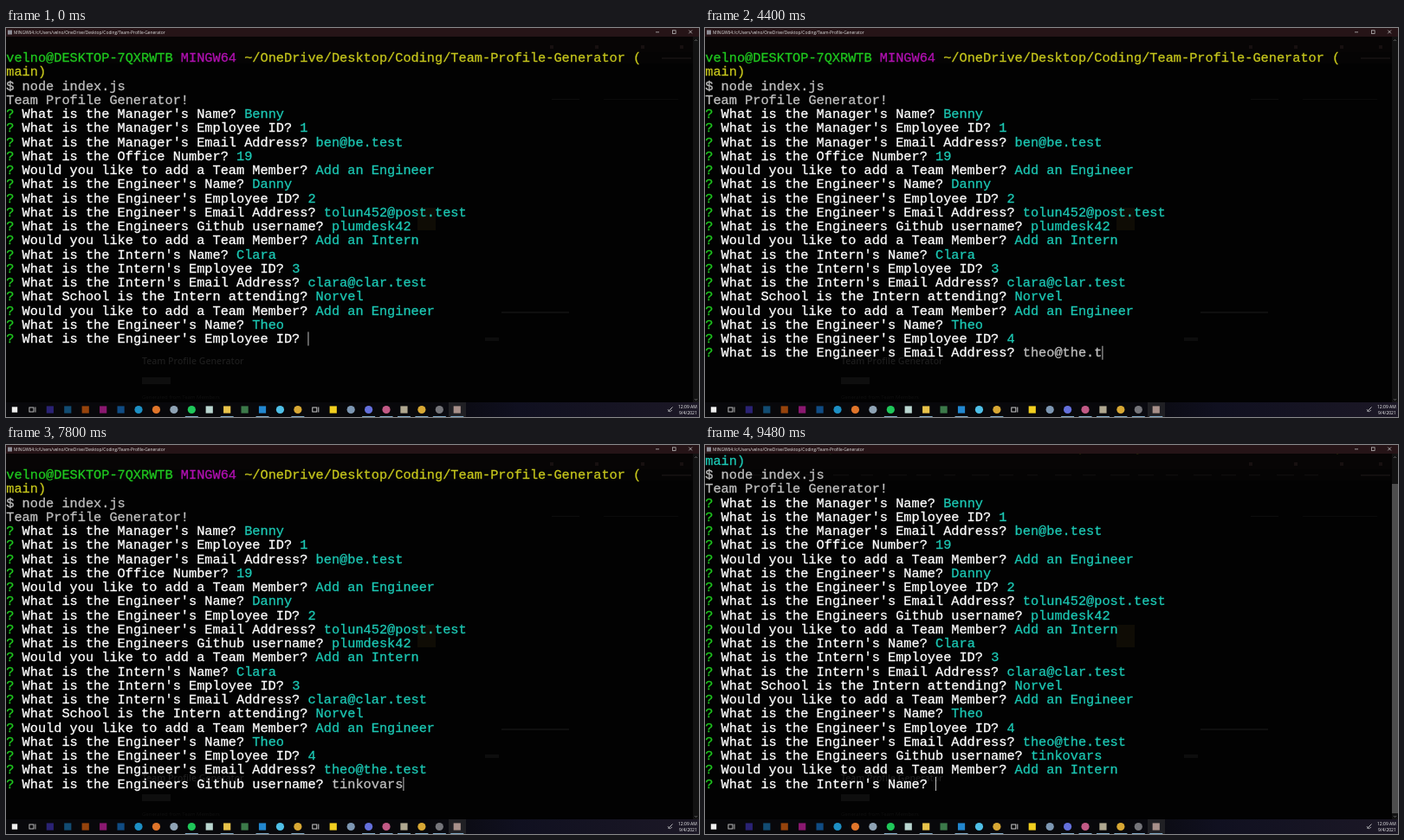
Animation of 800x450 px, one loop 9.52 s. Source, as an HTML page with a canvas:

```html
<!DOCTYPE html>
<html lang="en">
<head>
<meta charset="utf-8">
<title>Team Profile Generator</title>
<style>
html, body { margin: 0; width: 100%; height: 100%; overflow: hidden; background: #000; }
canvas { display: block; }
</style>
</head>
<body>
<canvas id="stage" width="800" height="450"></canvas>
<script>
const ctx = document.getElementById('stage').getContext('2d');
const LOOP = 9520, BLINK = 560;
const CHAR = 9.162, ROW = 16.25, BASE = 39, LEFT = 0.3;
const MONO = '15.27px "Liberation Mono", monospace';
const SANS = '"Open Sans", sans-serif';
const WHITE = '#ffffff', GRAY = '#bfbfbf', CYAN = '#1cc8b4', GREEN = '#1fc81f',
      MAGENTA = '#b010b0', YELLOW = '#c6c61c';

const MEMBER = 'Would you like to add a Team Member?';
const ENGINEER = 'Add an Engineer', INTERN = 'Add an Intern';
const EMAIL = { text: 'theo@the.test', start: 2800, step: 172 };
const USER = { text: 'tinkovars', start: 6600, step: 140 };
const ID_KEY = 360, ID_ENTER = 520, EMAIL_ENTER = 5120, USER_ENTER = 7900,
      THUMB_FADE = 8000, ARROW_DOWN = 8920, MENU_ENTER = 9160;

const ask = (question, answer = '', color = CYAN) =>
  [['? ', GREEN], [question + ' ', WHITE], [answer, color]];

const history = [
  [['velno@DESKTOP-7QXRWTB ', GREEN], ['MINGW64 ', MAGENTA],
   ['~/OneDrive/Desktop/Coding/Team-Profile-Generator (', YELLOW]],
  [['main)', YELLOW]],
  [['$ node index.js', GRAY]],
  [['Team Profile Generator!', GRAY]],
  ask("What is the Manager's Name?", 'Benny'),
  ask("What is the Manager's Employee ID?", '1'),
  ask("What is the Manager's Email Address?", 'ben@be.test'),
  ask('What is the Office Number?', '19'),
  ask(MEMBER, ENGINEER),
  ask("What is the Engineer's Name?", 'Danny'),
  ask("What is the Engineer's Employee ID?", '2'),
  ask("What is the Engineer's Email Address?", 'tolun452@post.test'),
  ask('What is the Engineers Github username?', 'plumdesk42'),
  ask(MEMBER, INTERN),
  ask("What is the Intern's Name?", 'Clara'),
  ask("What is the Intern's Employee ID?", '3'),
  ask("What is the Intern's Email Address?", 'clara@clar.test'),
  ask('What School is the Intern attending?', 'Norvel'),
  ask(MEMBER, ENGINEER),
  ask("What is the Engineer's Name?", 'Theo'),
];

function typed({ text, start, step }, t) {
  const count = Math.max(0, Math.min(text.length, Math.floor((t - start) / step) + 1));
  return { text: text.slice(0, count), last: count ? start + (count - 1) * step : -Infinity };
}

// Rows on screen at time t, and when the cursor last moved (null while hidden).
function terminal(t) {
  const rows = history.slice();
  let moved = -160;

  const add = (question, enter, answer, since, last) => {
    const done = t >= enter;
    rows.push(ask(question, answer, done ? CYAN : GRAY));
    if (!done) moved = Math.max(since, last);
    return done;
  };

  const idShown = t >= ID_KEY;
  if (!add("What is the Engineer's Employee ID?", ID_ENTER, idShown ? '4' : '',
           -160, idShown ? ID_KEY : -160)) return { rows, moved };
  const email = typed(EMAIL, t);
  if (!add("What is the Engineer's Email Address?", EMAIL_ENTER, email.text,
           ID_ENTER, email.last)) return { rows, moved };
  const user = typed(USER, t);
  if (!add('What is the Engineers Github username?', USER_ENTER, user.text,
           EMAIL_ENTER, user.last)) return { rows, moved };

  rows[1] = [['main)', CYAN]];
  if (t >= MENU_ENTER) {
    rows.push(ask(MEMBER, INTERN), ask("What is the Intern's Name?"));
    return { rows, moved: MENU_ENTER, scroll: 2 };
  }
  const down = t >= ARROW_DOWN;
  const option = (name, on) => [[(on ? '> ' : '  ') + name, on ? CYAN : GRAY]];
  rows.push(ask(MEMBER, down ? '' : '(Use arrow keys)', GRAY),
            option(ENGINEER, !down), option(INTERN, down));
  return { rows, moved: null, scroll: 2 };
}

function box(x, y, w, h, color) {
  ctx.fillStyle = color;
  ctx.fillRect(x, y, w, h);
}

function dot(x, y, r, color) {
  ctx.fillStyle = color;
  ctx.beginPath();
  ctx.arc(x, y, r, 0, Math.PI * 2);
  ctx.fill();
}

function label(text, x, y, font, color) {
  ctx.font = font;
  ctx.fillStyle = color;
  ctx.fillText(text, x, y);
}

function stroke(color, width, ...points) {
  ctx.strokeStyle = color;
  ctx.lineWidth = width;
  ctx.beginPath();
  points.forEach(([x, y], i) => i ? ctx.lineTo(x, y) : ctx.moveTo(x, y));
  ctx.stroke();
}

// Dim windows showing through the translucent terminal.
function drawBackdrop() {
  box(0, 10, 800, 423, '#020202');
  box(0, 10, 793, 18, '#070505');
  box(0, 28, 793, 13, '#050404');
  for (let i = 0; i < 22; i++) box(20 + i * 32, 34, 12 + i * 7 % 11, 1.5, '#0e0c0c');
  [628, 680, 733, 778].forEach(x => box(x, 20, 4, 4, '#171010'));
  box(630, 82, 32, 1, '#0d0d0d');
  box(690, 82, 86, 1, '#0a0a0a');
  box(757, 34, 34, 2, '#120f0f');
  box(475, 208, 21, 26, '#0f0c05');
  box(572, 328, 78, 2, '#0f0f0f');
  box(553, 358, 16, 4, '#0d0d0d');
  label('Team Profile Generator', 157, 389, '600 10.5px ' + SANS, '#1c1c1c');
  box(157, 404, 33, 8, '#0e0e0e');
  label('Generated from Team Members', 157, 429, '6px ' + SANS, '#111');
}

function drawTitleBar() {
  box(0, 0, 800, 10, '#261417');
  box(2, 2.5, 5, 5, '#8d8d96');
  label('MINGW64:/c/Users/velno/OneDrive/Desktop/Coding/Team-Profile-Generator',
        9, 6.8, '4.9px ' + SANS, '#e0e0e0');
  stroke('#ccc', 0.7, [750, 4.8], [754, 4.8]);
  ctx.strokeRect(769.5, 2.8, 3.6, 3.6);
  stroke('#ddd', 0.7, [788.3, 2.6], [792, 6.3]);
  stroke('#ddd', 0.7, [792, 2.6], [788.3, 6.3]);
}

function drawScrollBar(t) {
  box(793, 10, 7, 423, '#121212');
  ctx.globalAlpha = Math.max(0, Math.min(1, (t - THUMB_FADE) / 300));
  box(793, 45, 7, 381, '#4d4d4d');
  ctx.globalAlpha = 1;
  stroke('#777', 0.8, [795, 15], [796.5, 13.5], [798, 15]);
  stroke('#777', 0.8, [795, 429], [796.5, 430.5], [798, 429]);
}

// Plain marks: s = square, o = circle, v = outlined task view.
const ICONS = ('s#eeeeee v#cccccc s#2a2274 s#124c72 s#96430c s#8a1870 s#104c84 o#1d8fc4 o#e0752a ' +
  'o#8fa3b5 o#1fc75a s#b9d6d0 s#e8c34a s#3c7a4a s#2287d0 o#4fc0e8 o#d8a834 v#dddddd s#f2cf1f ' +
  'o#7d97b3 o#6470dc o#c25a86 s#b0a890 o#d8a834 o#75757a s#a8908a').split(' ');
const RUNNING = [10, 12, 14, 16, 20, 21, 22, 23, 24, 25];

function drawTaskBar() {
  const tint = ctx.createLinearGradient(480, 0, 800, 0);
  tint.addColorStop(0, '#08080b');
  tint.addColorStop(0.35, '#101020');
  tint.addColorStop(1, '#1c1826');
  box(0, 433, 800, 17, tint);
  box(511, 433, 20, 17, '#202024');
  ICONS.forEach((icon, i) => {
    const x = 10 + i * 20.43, y = 441.5, color = icon.slice(1);
    if (icon[0] === 'o') dot(x, y, 4.6, color);
    else if (icon[0] === 's') {
      const half = i ? 4.1 : 3.2;
      box(x - half, y - half, half * 2, half * 2, color);
    } else {
      ctx.strokeStyle = color;
      ctx.lineWidth = 0.9;
      ctx.strokeRect(x - 3.5, y - 2.5, 5, 5);
      stroke(color, 0.9, [x + 3.5, y - 3], [x + 3.5, y + 3]);
    }
    if (RUNNING.includes(i)) box(x - 7.5, 449, 15, 1, '#7fa8c4');
  });
  stroke('#ccc', 0.9, [764.5, 443.5], [769.5, 438.5]);
  stroke('#ccc', 0.7, [764, 441], [766, 444], [769, 442]);
  label('12:09 AM', 776, 439.5, '5px ' + SANS, '#f0f0f0');
  label('9/4/2021', 777, 447, '5px ' + SANS, '#f0f0f0');
}

function drawTerminal(t, { rows, moved, scroll = 0 }) {
  ctx.save();
  ctx.beginPath();
  ctx.rect(0, 10.5, 793, 395.5);
  ctx.clip();
  let col, y;
  rows.forEach((row, i) => {
    y = BASE + (i - scroll) * ROW;
    col = 0;
    for (const [text, color] of row) {
      const x = LEFT + col * CHAR;
      label(text, x, y, MONO, color);
      // A hairline outline thickens the strokes.
      ctx.strokeStyle = color;
      ctx.lineWidth = 0.3;
      ctx.strokeText(text, x, y);
      col += text.length;
    }
  });
  if (moved !== null && (t - moved) % (2 * BLINK) < BLINK)
    box(LEFT + col * CHAR, y - 12.5, 1, 16, GRAY);
  ctx.restore();
}

function frame(now) {
  const t = now % LOOP;
  drawBackdrop();
  drawTerminal(t, terminal(t));
  drawScrollBar(t);
  drawTitleBar();
  drawTaskBar();
  requestAnimationFrame(frame);
}
requestAnimationFrame(frame);
</script>
</body>
</html>
```
